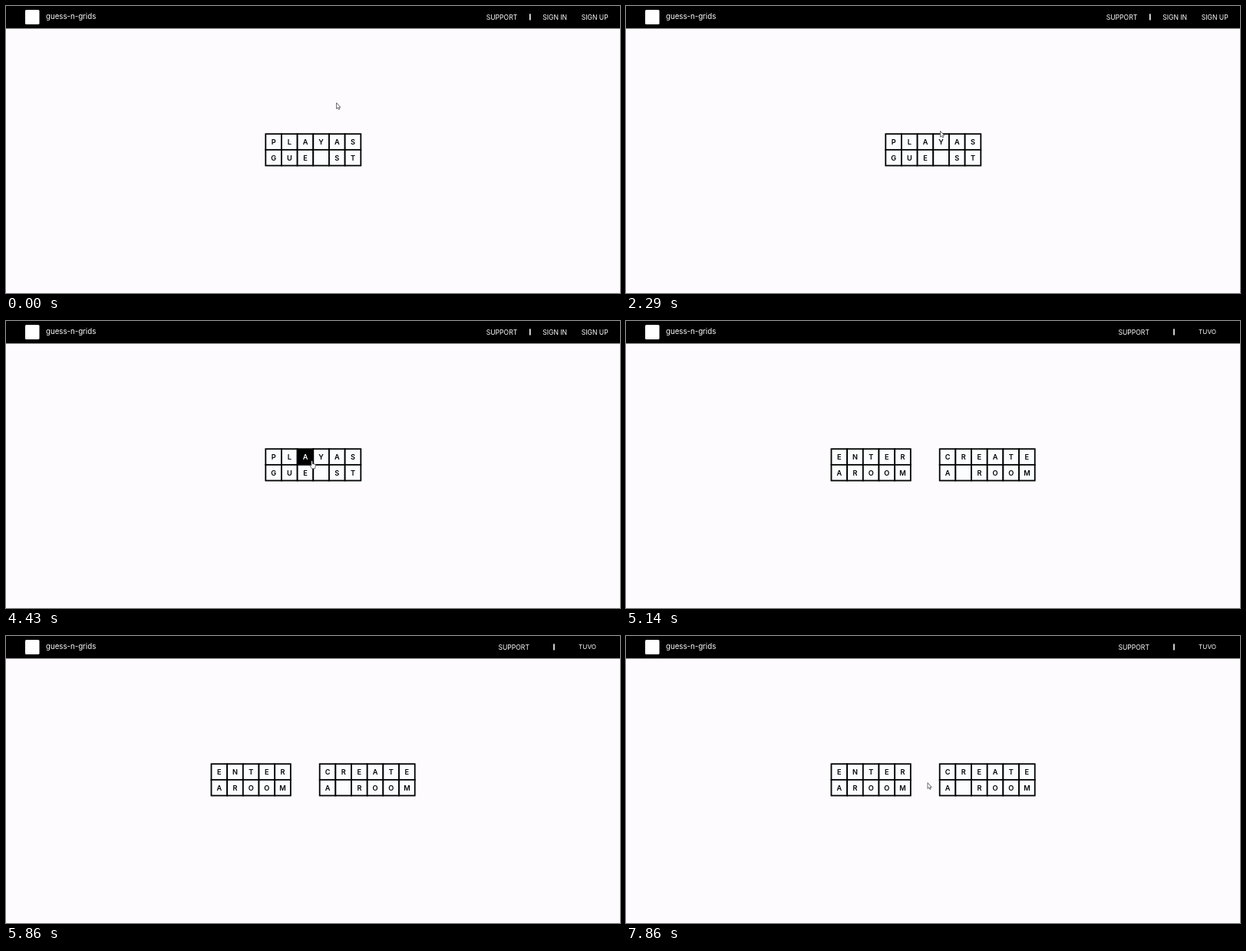
An HTML page for the animation above (8000 ms loop, 800 by 375 pixels).

```html
<!DOCTYPE html>
<html lang="en">
<head>
<meta charset="utf-8">
<title>Word grid lobby</title>
<style>
  html, body { margin: 0; width: 100%; height: 100%; overflow: hidden; background: #fdfbfe; }
  svg { display: block; width: 100%; height: 100%; }
  text { font-family: Inter, "Open Sans", sans-serif; }
  .nav { fill: #fff; font-size: 8.6px; }
  .cell rect { fill: #fbfdfe; stroke: #000; stroke-width: 1.8; }
  .cell text { font-size: 9.2px; font-weight: 600; text-anchor: middle; }
  .cell.hover rect { fill: #000; }
  .cell.hover text { fill: #fff; }
  .pointer { fill: #fff; stroke: #444; stroke-width: .8; stroke-linejoin: round; }
</style>
</head>
<body>
<svg viewBox="0 0 800 375">
  <rect width="800" height="375" fill="#fdfbfe"/>
  <rect width="800" height="29.4"/>
  <rect x="25" y="5" width="18.5" height="19" rx="1.5" fill="#fff"/>
  <text class="nav" x="52" y="17.4" style="font-size:9.7px">guess-n-grids</text>

  <g id="welcome">
    <g class="nav">
      <text x="625.7" y="17.5">SUPPORT</text>
      <rect x="682" y="10.3" width="1.6" height="8.2"/>
      <text x="699.2" y="17.5">SIGN IN</text>
      <text x="749.7" y="17.5">SIGN UP</text>
    </g>
  </g>
  <g id="rooms">
    <g class="nav">
      <text x="641.4" y="17.5">SUPPORT</text>
      <rect x="713.2" y="10.3" width="1.6" height="8.2"/>
      <text x="746" y="17.4" style="font-size:8.2px">TUVO</text>
    </g>
  </g>

  <path id="arrow" class="pointer" d="M0 0V7.8L1.8 6.2L3 8.8L4.2 8.2L3.1 5.8H5.2Z"/>
  <path id="hand" class="pointer" d="M-.8 .8Q0-.4 .8 .8V4L4 4.7Q5 5 4.8 6.2L4 10.4H0L-2.6 6.7Q-2.3 5.4-.8 6.6Z"/>
</svg>
<script>
const NS = 'http://www.w3.org/2000/svg', LOOP = 8000, SWITCH = 4570, SIZE = 20.67, TOP = 167.2;
const $ = id => document.getElementById(id);

function add(parent, tag, attrs, text = '') {
  const el = document.createElementNS(NS, tag);
  for (const key in attrs) el.setAttribute(key, attrs[key]);
  el.textContent = text;
  return parent.appendChild(el);
}

function grid(parent, left, rows) {
  return rows.flatMap((word, row) => [...word].map((letter, col) => {
    const x = left + col * SIZE, y = TOP + row * SIZE;
    const el = add(parent, 'g', { class: 'cell' });
    add(el, 'rect', { x, y, width: SIZE, height: SIZE });
    add(el, 'text', { x: x + SIZE / 2, y: y + 13.7 }, letter.trim());
    return { el, x, y };
  }));
}

const cells = grid($('welcome'), 338.3, ['PLAYAS', 'GUE ST']);
grid($('rooms'), 267.5, ['ENTER', 'AROOM']);
grid($('rooms'), 408.7, ['CREATE', 'A ROOM']);

// Pointer tip as [time, x, y]
const path = [[0, 430.6, 126.5], [1860, 430.6, 126.5], [2570, 398.6, 182.5], [SWITCH, 398.6, 182.5],
  [6000, 385, 212], [6860, 391, 196], [7860, 393, 191.7], [LOOP, 393, 191.7]];

function pointerAt(t) {
  const i = path.findIndex(p => p[0] > t);
  const [t0, x0, y0] = path[i - 1], [t1, x1, y1] = path[i];
  let k = (t - t0) / (t1 - t0);
  k = k * k * (3 - 2 * k);
  return [x0 + (x1 - x0) * k, y0 + (y1 - y0) * k];
}

const show = (el, on) => { el.style.display = on ? '' : 'none'; };

function draw(now) {
  const t = now % LOOP, onWelcome = t < SWITCH;
  const [x, y] = pointerAt(t);
  let over = false;
  for (const c of cells) {
    const hit = onWelcome && x >= c.x && x < c.x + SIZE && y >= c.y && y < c.y + SIZE;
    c.el.classList.toggle('hover', hit);
    over ||= hit;
  }
  show($('welcome'), onWelcome);
  show($('rooms'), !onWelcome);
  show($('hand'), over);
  show($('arrow'), !over && (onWelcome || t >= 6000));
  for (const id of ['arrow', 'hand']) $(id).setAttribute('transform', `translate(${x} ${y})`);
  requestAnimationFrame(draw);
}
requestAnimationFrame(draw);
</script>
</body>
</html>
```
